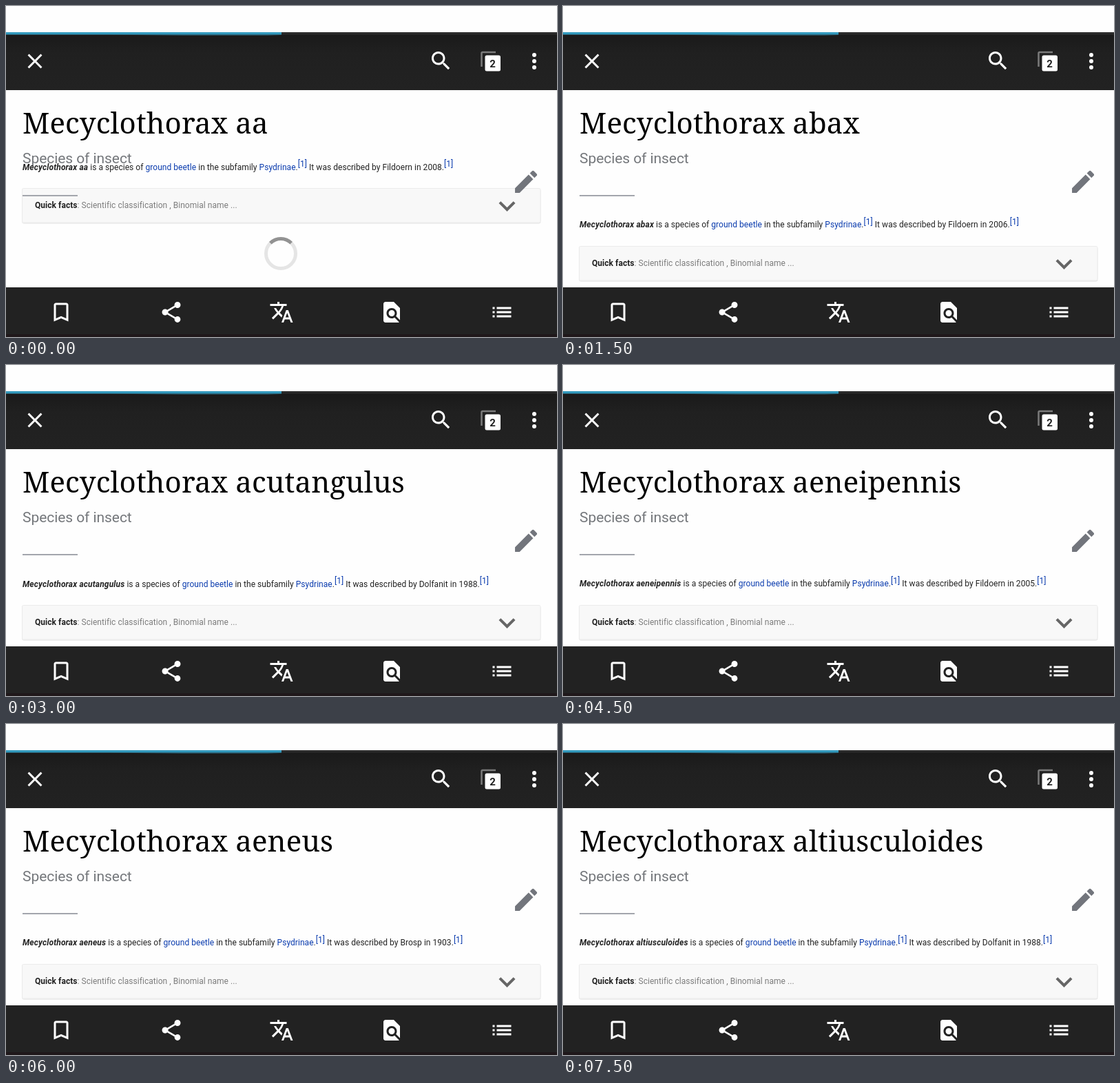
Recreate the animation shown at these times as an HTML page. Size 800 px wide and 480 px high, loop 8 s.

```html
<!DOCTYPE html>
<html lang="en">
<head>
<meta charset="utf-8">
<style>
html, body { margin: 0; width: 100%; height: 100%; overflow: hidden; background: #fefefe; }
svg { display: block; width: 800px; height: 480px; }
text { font-family: Roboto, sans-serif; font-size: 12px; letter-spacing: .04px; white-space: pre; fill: #222; }
#title { font-family: "Noto Serif", serif; font-size: 42px; letter-spacing: .11px; fill: #000; }
#subtitle { font-size: 21px; letter-spacing: -.06px; fill: #74777b; }
#tabs { font-size: 15px; font-weight: 700; text-anchor: middle; }
.b { font-weight: 700; }
.i { font-style: italic; letter-spacing: .15px; }
.link { fill: #0b3cae; }
.dim { fill: #7c7c7c; }
</style>
</head>
<body>
<svg viewBox="0 0 800 480">
  <defs>
    <linearGradient id="bar" x2="0" y2="1">
      <stop offset="0" stop-color="#191919"/>
      <stop offset=".35" stop-color="#202020"/>
      <stop offset="1" stop-color="#222"/>
    </linearGradient>
    <filter id="shadow" x="-5%" y="-20%" width="110%" height="150%">
      <feDropShadow dx="0" dy="1" stdDeviation=".7" flood-opacity=".13"/>
    </filter>
  </defs>
  <rect width="800" height="480" fill="#fefefe"/>

  <text id="title" x="24" y="185"></text>
  <text id="subtitle" x="24" y="228">Species of insect</text>
  <text id="intro" x="24"></text>
  <g id="facts">
    <rect x="23.5" y="348.5" width="752.5" height="49.5" rx="2" fill="#f8f8f8" stroke="#ebebeb" filter="url(#shadow)"/>
    <text x="42" y="377"><tspan class="b">Quick facts</tspan><tspan class="dim">: Scientific classification , Binomial name ...</tspan></text>
    <path transform="translate(703.5 350) scale(2)" fill="#666" d="M16.59 8.59L12 13.17 7.41 8.59 6 10l6 6 6-6z"/>
  </g>
  <rect x="24" y="274" width="80" height="2" fill="#a3a6ad"/>
  <path transform="translate(733.7 233.5) scale(1.78)" fill="#72757c" d="M3 17.25V21h3.75L17.81 9.94l-3.75-3.75L3 17.25zM20.71 7.04c.39-.39.39-1.02 0-1.41l-2.34-2.34c-.39-.39-1.02-.39-1.41 0l-1.83 1.83 3.75 3.75 1.83-1.83z"/>
  <g id="spinner" fill="none" stroke-width="5">
    <circle cx="399" cy="359" r="21.5" stroke="#e5e5e5"/>
    <path d="M383.8 343.8A21.5 21.5 0 0 1 414.2 343.8" stroke="#929292"/>
  </g>

  <rect y="38" width="800" height="84" fill="url(#bar)"/>
  <rect y="38" width="800" height="3.5" fill="#2b2b2b"/>
  <rect y="38" width="400" height="3.5" fill="#3299bd"/>
  <path d="M150 41.500H400V42L380 43H260Z" fill="#3299bd" opacity=".35"/>
  <rect y="408" width="800" height="72" fill="#222"/>
  <rect y="476" width="800" height="4" fill="#1f181a"/>

  <g id="icons" fill="#fff"></g>
  <path d="M690.500 88V68.500Q690.500 67 692 67H711" fill="none" stroke="#7b7b7b" stroke-width="2.5"/>
  <rect x="695.500" y="71.500" width="22.500" height="23" rx="2.500" fill="#fff"/>
  <text id="tabs" x="706.500" y="88.500">2</text>
  <g fill="#fff"><circle cx="767" cy="71" r="3"/><circle cx="767" cy="80" r="3"/><circle cx="767" cy="89" r="3"/></g>
</svg>
<script>
const $ = id => document.getElementById(id);

// Centre x, centre y, outline on a 24-unit grid.
const icons = [
  [42, 80, "M19 6.41L17.59 5 12 10.59 6.41 5 5 6.41 10.59 12 5 17.59 6.41 19 12 13.41 17.59 19 19 17.59 13.41 12z"],
  [631.5, 79.5, "M15.5 14h-.79l-.28-.27C15.41 12.59 16 11.11 16 9.5 16 5.91 13.09 3 9.5 3S3 5.91 3 9.5 5.91 16 9.5 16c1.61 0 3.09-.59 4.23-1.57l.27.28v.79l5 4.99L20.49 19l-4.99-5zm-6 0C7.01 14 5 11.99 5 9.5S7.01 5 9.5 5 14 7.01 14 9.5 11.99 14 9.5 14z"],
  [80, 444, "M17 3H7c-1.1 0-1.99.9-1.99 2L5 21l7-3 7 3V5c0-1.1-.9-2-2-2zm0 15l-5-2.18L7 18V5h10v13z"],
  [240, 444, "M18 16.08c-.76 0-1.44.3-1.96.77L8.91 12.7c.05-.23.09-.46.09-.7s-.04-.47-.09-.7l7.05-4.11c.54.5 1.25.81 2.04.81 1.66 0 3-1.34 3-3s-1.34-3-3-3-3 1.34-3 3c0 .24.04.47.09.7L8.04 9.81C7.5 9.31 6.79 9 6 9c-1.66 0-3 1.34-3 3s1.34 3 3 3c.79 0 1.5-.31 2.04-.81l7.12 4.16c-.05.21-.08.43-.08.65 0 1.61 1.31 2.92 2.92 2.92s2.92-1.31 2.92-2.92-1.31-2.92-2.92-2.92z"],
  [400, 444, "M12.87 15.07l-2.54-2.51.03-.03c1.74-1.94 2.98-4.17 3.71-6.53H17V4h-7V2H8v2H1v1.99h11.17C11.5 7.92 10.44 9.75 9 11.35 8.07 10.32 7.3 9.19 6.69 8h-2c.73 1.63 1.73 3.17 2.98 4.56l-5.09 5.02L4 19l5-5 3.11 3.11.76-2.04zM18.5 10h-2L12 22h2l1.12-3h4.75L21 22h2l-4.5-12zm-2.62 7l1.62-4.33L19.12 17h-3.24z"],
  [560, 444, "M20 19.59V8l-6-6H6c-1.1 0-1.99.9-1.99 2L4 20c0 1.1.89 2 1.99 2H18c.45 0 .85-.15 1.19-.4l-4.43-4.43c-.8.52-1.74.83-2.76.83-2.76 0-5-2.24-5-5s2.24-5 5-5 5 2.24 5 5c0 1.02-.31 1.96-.83 2.75L20 19.59zM9 13c0 1.66 1.34 3 3 3s3-1.34 3-3-1.34-3-3-3-3 1.34-3 3z"],
  [720, 444, "M3 13h2v-2H3v2zm0 4h2v-2H3v2zm0-8h2V7H3v2zm4 4h14v-2H7v2zm0 4h14v-2H7v2zM7 7v2h14V7H7z"]
];
$("icons").innerHTML = icons.map(([x, y, d]) =>
  `<path transform="translate(${x - 18} ${y - 18}) scale(1.5)" d="${d}"/>`).join("");

const LOOP = 8000, HOLD = 1500;
const pages = [
  { name: "aa", by: "Fildoern", year: 2008, y: 322, shift: -84 },
  { name: "abax", by: "Fildoern", year: 2006 },
  { name: "acutangulus", by: "Dolfanit", year: 1988, y: 322 },
  { name: "aeneipennis", by: "Fildoern", year: 2005 },
  { name: "aeneus", by: "Brosp", year: 1903 },
  { name: "altiusculoides", by: "Dolfanit", year: 1988 }
];
let shown = -1;

function draw(t) {
  const n = Math.floor(t / HOLD);
  if (n === shown) return;
  shown = n;
  const { name, by, year, y = 321, shift = 0 } = pages[n];
  const base = y + shift;
  const span = (cls, s, at = base) => `<tspan class="${cls}" y="${at}">${s}</tspan>`;
  const ref = span("link", "[1]", 317 + shift);
  $("title").textContent = `Mecyclothorax ${name}`;
  $("intro").innerHTML = span("b i", `Mecyclothorax ${name}`) + span("", " is a species of ") +
    span("link", "ground beetle") + span("", " in the subfamily ") + span("link", "Psydrinae") +
    span("", ".") + ref + span("", ` It was described by ${by} in ${year}.`) + ref;
  $("facts").setAttribute("transform", `translate(0 ${shift})`);
  $("spinner").style.display = n ? "none" : "";
}

const start = performance.now();
function tick() {
  draw((performance.now() - start) % LOOP);
  requestAnimationFrame(tick);
}
tick();
</script>
</body>
</html>
```
